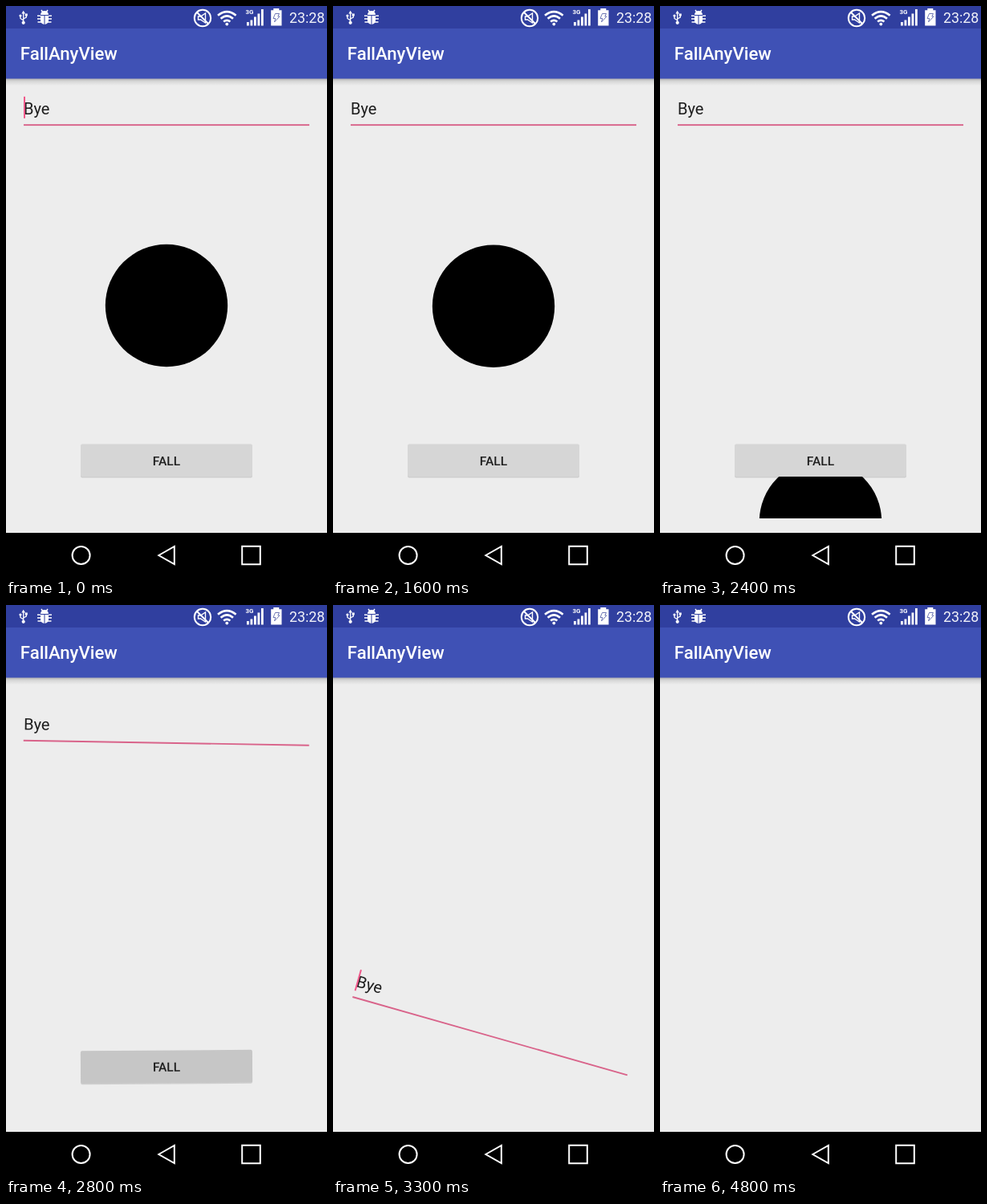
Animation, 400 px wide and 711 px high, one loop 4.9 s. Source, as an HTML page:

```html
<!DOCTYPE html>
<html lang="en">
<head>
<meta charset="utf-8">
<title>FallAnyView</title>
<style>
  html, body { margin: 0; width: 100%; height: 100%; overflow: hidden; background: #ededed; }
  svg { display: block; width: 100vw; height: 100vh; }
  text { font-family: Roboto, sans-serif; }
  .medium { font-weight: 500; }
  .line { fill: none; stroke: #fff; stroke-width: 2; }
</style>
</head>
<body>
<svg viewBox="0 0 400 711">
  <defs>
    <linearGradient id="shade" x2="0" y2="1">
      <stop offset="0" stop-opacity=".27"/>
      <stop offset=".4" stop-opacity=".1"/>
      <stop offset="1" stop-opacity="0"/>
    </linearGradient>
    <clipPath id="content"><rect x="18" y="109" width="364" height="529"/></clipPath>
  </defs>

  <rect width="400" height="711" fill="#ededed"/>

  <g clip-path="url(#content)">
    <g id="field">
      <rect x="22" y="147.2" width="356" height="1.9" fill="#d9638a"/>
      <text x="22" y="134.6" font-size="20" fill="#1e1e1e">Bye</text>
      <rect id="cursor" x="22" y="112.8" width="2" height="27" fill="#f0588a"/>
    </g>
    <circle id="ball" cx="200" cy="373" r="76.2"/>
    <g id="button">
      <rect x="93" y="547" width="214" height="40.5" rx="2" fill="#000" opacity=".13"/>
      <rect id="face" x="93" y="545.5" width="214" height="40.5" rx="2"/>
      <text class="medium" x="200" y="571.7" font-size="15.55" text-anchor="middle" fill="#1e1e1e">FALL</text>
    </g>
  </g>

  <rect y="90" width="400" height="9" fill="url(#shade)"/>
  <rect width="400" height="90.5" fill="#3f51b5"/>
  <rect width="400" height="28" fill="#303f9f"/>
  <text class="medium" x="17.8" y="67.4" font-size="22.2" fill="#fff">FallAnyView</text>

  <!-- status icons -->
  <g fill="#fff">
    <path class="line" style="stroke-width:1.3" d="M21.7 9V20M21.7 18L18 15.5V12M21.7 16L25.3 14V11"/>
    <path d="M21.7 5.8L24 9.5H19.4ZM23.8 9.5h3v3h-3Z"/>
    <circle cx="18" cy="12" r="1.6"/>
    <circle cx="21.7" cy="20.8" r="2.1"/>

    <path class="line" style="stroke-width:1.4" d="M39 12.2H57M39 16H57M39.5 20H56.5M44 5L46 8M52 5L50 8"/>
    <path d="M43 11a5 5 0 0 1 10 0ZM43 12h10v6a5 5 0 0 1-10 0Z"/>
    <path d="M48 12V23M42.5 11.6H53.5" stroke="#303f9f"/>

    <circle class="line" cx="245" cy="15" r="10.2"/>
    <path class="line" style="stroke-width:1.4" d="M239.5 13H242.5L248.5 9V21L242.5 17H239.5Z"/>
    <path class="line" d="M238 8L252 22"/>

    <path class="line" style="stroke-width:2.6" d="M264 11.8Q275.3 2.5 286.6 11.8M267.6 15.8Q275.3 9 283 15.8M271.2 19.6Q275.3 16 279.4 19.6"/>
    <circle cx="275.3" cy="22.6" r="1.9"/>

    <text x="298.4" y="10.3" font-size="8" font-weight="700">3G</text>
    <path d="M300 20h2.8v4.5h-2.8ZM304.5 17.5h2.8v7h-2.8ZM309 13.5h2.8v11h-2.8ZM313.5 9.5h2.8v15h-2.8ZM318 4h2.8v20.5h-2.8Z"/>

    <path d="M333.3 3h7v2.2h3.2V24.5H330.2V5.2h3.1Z"/>
    <path d="M335.5 9.5H340.5L338.8 13H341L334.5 20L335.8 15.5H333Z" fill="none" stroke="#6f78b5"/>
    <text x="353" y="21" font-size="17.8" fill="#f0f1f8">23:28</text>
  </g>

  <!-- navigation bar -->
  <rect y="656" width="400" height="55"/>
  <g class="line">
    <circle cx="93.6" cy="684" r="11"/>
    <path d="M190.3 684L209.8 673V695ZM294.2 672.8H316.8V695.2H294.2Z"/>
  </g>
</svg>
<script>
  const LOOP = 4900, STEP = 100, DROP = 711;
  const $ = id => document.getElementById(id);
  const blinks = [[0, 600], [1100, 1600], [2000, 2400], [2900, 3400]];

  // turn: full rotation in degrees, reached at the end of the drop
  const falls = [
    { el: $('ball'), start: 1557, span: 2000, turn: -30, cy: 373 },
    { el: $('field'), start: 2659, span: 1209, turn: 29, cy: 132 },
    { el: $('button'), start: 2713, span: 1209, turn: -30, cy: 566 }
  ];

  function fall({ el, start, span, turn, cy }, t) {
    const x = Math.min(1, Math.max(0, (t - start) / span));
    const eased = (1 - Math.cos(Math.PI * x)) / 2;
    el.setAttribute('transform', `translate(0 ${DROP * eased}) rotate(${turn * eased} 200 ${cy})`);
  }

  function draw(now) {
    const t = Math.floor((now % LOOP) / STEP) * STEP;
    falls.forEach(item => fall(item, t));
    const lit = blinks.some(([on, off]) => t >= on && t < off);
    $('cursor').setAttribute('visibility', lit ? 'visible' : 'hidden');
    $('face').setAttribute('fill', t >= 2600 ? '#c6c6c6' : '#d6d6d6');
  }

  const begin = performance.now();
  function tick() {
    draw(performance.now() - begin);
    requestAnimationFrame(tick);
  }
  tick();
</script>
</body>
</html>
```
